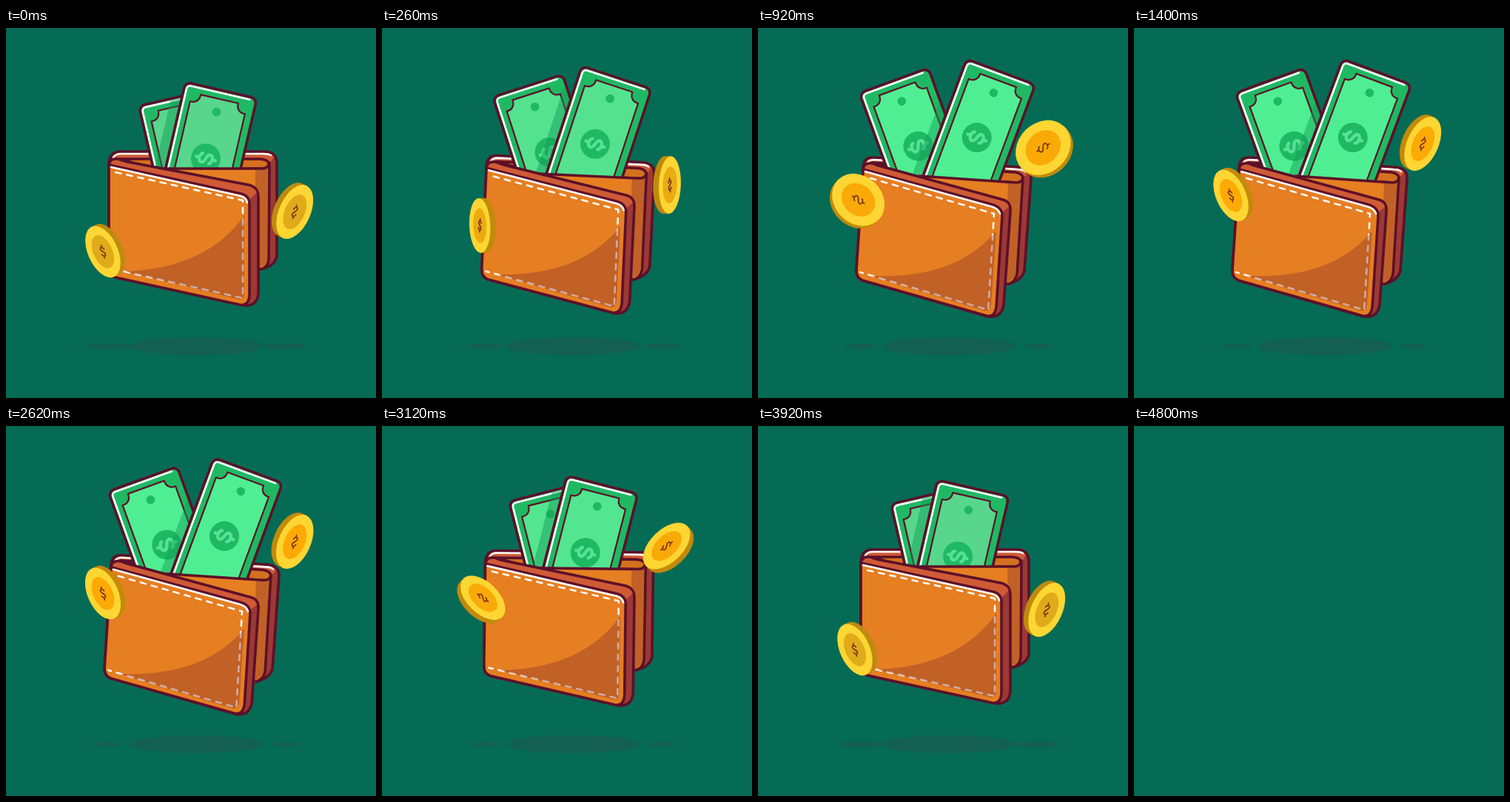
These frames come from a looping animation (500 px wide and 500 px high, 4820 ms). An HTML page:

```html
<!DOCTYPE html>
<html lang="en">
<head>
<meta charset="utf-8">
<title>Wallet</title>
<style>
  html, body { margin: 0; width: 100%; height: 100%; overflow: hidden; background: #056b55; }
  svg { display: block; width: 100%; height: 100%; }
  .line { stroke: #5c1029; stroke-width: 3.6; stroke-linejoin: round; stroke-linecap: round; }
  .thin { stroke-width: 2.2; }
  .orange { fill: #e67e22; }
  .red { fill: #cf5b36; }
  .dark { fill: #9c3935; }
  .shade { fill: #8e3a2c; opacity: .42; }
  .white { fill: none; stroke: #fff; stroke-width: 2.6; stroke-linecap: round; stroke-linejoin: round; }
  .stitch { stroke-width: 2.5; stroke-dasharray: 7.5 8; }
  .none { fill: none; }
  .edge { fill: #20b963; }
  .paper { fill: var(--paper); }
  .sign { fill: none; stroke-width: 4.4; stroke-linecap: round; }
  .stamp { stroke-width: 1.7; vector-effect: non-scaling-stroke; }
  .shadow { fill: #135f50; }
</style>
</head>
<body>
<svg viewBox="0 0 500 500">
  <defs>
    <path id="dollar" d="M6 -5.5C4 -10 -6 -10 -6 -5C-6 1 6 -1 6 5C6 10 -4 10 -6 5.5M0 -13V-9M0 9V13"/>
    <clipPath id="note"><rect x="1.5" y="1.5" width="96" height="190" rx="7"/></clipPath>
    <g id="bill">
      <rect class="edge line" width="99" height="190" rx="8"/>
      <path class="white" d="M3.5 186V9Q3.5 3.5 9 3.5H90"/>
      <path class="paper line thin" d="M24 12H76V14A10 10 0 0 0 86 24H88V186H12V24H14A10 10 0 0 0 24 14Z"/>
      <circle class="edge" cx="50" cy="30" r="5.8"/>
      <circle class="edge" cx="50" cy="94.5" r="20"/>
      <use href="#dollar" class="sign" stroke="#55e294" transform="translate(50 94.5) rotate(90)"/>
    </g>
  </defs>

  <g id="scene">
    <ellipse class="shadow" cx="257.5" cy="430" rx="90" ry="12"/>
    <ellipse class="shadow" id="shadowL" cx="138.5" cy="430"/>
    <ellipse class="shadow" id="shadowR" cx="378" cy="430"/>

    <path class="dark line" d="M139 190L139 184Q140 167 154 167L350 167Q366 167 366 184L366 308Q364 321 345 326L200 300Z"
      data-to="M142 196L142 188Q143 174 156 175L352 188Q370 189 369 204L360 328Q357 341 338 346L196 315Z"/>
    <path class="red" d="M141 190Q141 169 154 169L350 169Q358 169 362 174L356 184L152 187Z"
      data-to="M144 195Q144 176 156 177L352 190Q361 190 365 195L358 204L154 192Z"/>
    <path class="white" d="M145 175Q148 170 155 170L348 170Q355 170 358 172"
      data-to="M148 182Q150 178 157 178L350 191Q358 191 361 194"/>
    <path class="line" fill="#d4701f" d="M153 177L344 177Q355 178 355 184Q354 190 346 190L200 190Z"
      data-to="M155 182L348 195Q358 197 358 203Q357 209 349 209L218 200Z"/>

    <use href="#bill" id="backBill"/>
    <g id="cast" clip-path="url(#note)">
      <rect id="band" x="-14" y="-20" width="16" height="230" fill="#0f9a55" opacity=".45"/>
    </g>
    <use href="#bill" id="frontBill"/>

    <path class="orange line" d="M200 190L346 190Q355 190 356 182L355 312Q354 324 344 326L250 300Z"
      data-to="M218 200L349 209Q357 209 358 202L350 332Q348 343 338 346L245 320Z"/>
    <path class="shade" d="M337 192L346 192Q353 191 354 187L353 312Q352 322 337 325Z"
      data-to="M338 210L349 211Q355 211 356 207L348 332Q346 342 332 345Z"/>

    <path class="dark line" d="M139 186Q140 175 152 177Q158 180 170 182L328 212Q341 215 341 229L341 358Q340 376 322 375L148 337Q139 334 139 324Z"
      data-to="M142 192Q142 181 155 183Q162 186 174 189L331 232Q342 235 341 248L332 374Q329 392 311 390L141 341Q132 337 133 326Z"/>
    <path class="red" d="M141 186Q142 177 152 179Q158 182 170 184L328 214Q336 216 339 222L329 232L318 226Z"
      data-to="M144 192Q144 183 155 185Q162 188 174 191L331 234Q338 236 339 242L330 249L318 241Z"/>
    <path class="orange line" d="M139 185L318 224Q329 227 329 238L329 361Q328 376 316 374L148 337Q139 334 139 324Z"
      data-to="M142 191L318 239Q330 243 330 254L322 377Q320 391 309 389L141 341Q132 337 133 326Z"/>
    <path class="white" d="M142 188L317 227Q325 229 326 236" data-to="M145 194L316 241.5Q325 244 327 251"/>
    <path class="white stitch" d="M148 195L320 233L320 365L146 326"
      data-to="M152 203L319 251L311 381L138 330"/>
    <path class="shade" d="M160 329Q272 325 322 253L322 358Q322 367 316 367Z"
      data-to="M152 335Q268 340 322 274L315 374Q313 383 306 382Z"/>

    <g id="coinL"></g>
    <g id="coinR"></g>
  </g>
</svg>
<script>
const LOOP = 4820, OPEN_END = 1400, CLOSE = 2610, CLOSE_END = 3920, BLANK = 4800;
const R = 37, THICK = 8;
const $ = id => document.getElementById(id);
const lerp = (a, b, k) => a + (b - a) * k;
const clamp = v => Math.min(1, Math.max(0, v));
const easeOut = (v, power) => 1 - (1 - clamp(v)) ** power;
const mix = (a, b, k) => `rgb(${a.map((v, i) => Math.round(lerp(v, b[i], k)))})`;

const NUM = /-?\d+(\.\d+)?/g;
const morphs = [...document.querySelectorAll('[data-to]')].map(el => ({
  el, from: el.getAttribute('d'), to: el.dataset.to.match(NUM).map(Number)
}));

// Smooth curve through keys that never overshoots them.
function track(times, vals) {
  const slope = i => (vals[i + 1] - vals[i]) / (times[i + 1] - times[i]);
  const tan = vals.map((_, i) => {
    if (!i || i === vals.length - 1) return 0;
    const a = slope(i - 1), b = slope(i);
    return a * b > 0 ? 2 * a * b / (a + b) : 0;
  });
  return t => {
    let i = 0;
    while (i < times.length - 2 && t > times[i + 1]) i++;
    const d = times[i + 1] - times[i], u = clamp((t - times[i]) / d), w = 1 - u;
    return vals[i] * (1 + 2 * u) * w * w + tan[i] * d * u * w * w
      + vals[i + 1] * u * u * (3 - 2 * u) - tan[i + 1] * d * u * u * w;
  };
}

const KEYS = [0, 540, 861, 1000, 1110, 1400];
const key = (...vals) => track(KEYS, vals);
const shift = key(0, 4, 0, 0, 0, 0);
const tilt = key(-24, 21.6, -46, -45, -36, -24);
const spin = key(57, 90, 126, 180, 207, 417);
const grow = key(1, 1, 1, 1.1, 1.05, 1);
const coins = [
  { el: $('coinL'), shadow: $('shadowL'), x: 134, dir: 1, size: 1, y: key(301, 229, 234.5, 232, 229, 225) },
  { el: $('coinR'), shadow: $('shadowR'), x: 387, dir: -1, size: 1.05, y: key(247, 169.5, 164.5, 162, 160, 155) }
];

function drawCoin(c, t) {
  const y = c.y(t), p = (c.y(0) - y) / (c.y(0) - c.y(OPEN_END));
  const a = spin(t) * Math.PI / 180, cos = Math.cos(a), s = c.size * grow(t);
  const rx = Math.abs(cos) * R, h = THICK / 2 * Math.sin(a);
  const near = cos > 0 ? -h : h, w = Math.abs(h);
  const side = mix([190, 138, 16], [196, 138, 10], p);
  const disc = (x, k, fill) => `<ellipse cx="${x}" rx="${rx * k}" ry="${R * k}" fill="${fill}"/>`;
  c.el.setAttribute('transform',
    `translate(${c.x + c.dir * shift(t)} ${y}) scale(${c.dir * s} ${s}) rotate(${tilt(t)})`);
  c.el.innerHTML = disc(-near, 1, side)
    + `<rect x="${-w}" y="${-R}" width="${2 * w}" height="${2 * R}" fill="${side}"/>`
    + disc(near, 1, '#fdd633')
    + disc(near, .64, mix([223, 171, 27], [253, 170, 5], p))
    + `<path d="${$('dollar').getAttribute('d')}" class="sign stamp" stroke="#7a3412"
        transform="translate(${near}) scale(${c.dir * cos} 1) scale(${c.dir} 1) rotate(15) scale(.7)"/>`;
  c.shadow.setAttribute('rx', lerp(30, 19, p));
  c.shadow.setAttribute('ry', lerp(4, 3, p));
}

function place(el, b) {
  el.setAttribute('transform', `translate(${b.x} ${b.y}) rotate(${b.r})`);
}

function draw(t) {
  $('scene').style.display = t < BLANK ? '' : 'none';
  const closing = t >= CLOSE, back = (t - CLOSE) / (CLOSE_END - CLOSE);
  const k = closing ? 1 - easeOut(back, 3.4) : easeOut((t - 10) / (OPEN_END - 10), 6);
  const glow = closing ? 1 - clamp(back) : clamp(t / 540);
  const coinTime = closing ? OPEN_END * (1 - clamp(back)) : Math.min(t, OPEN_END);

  for (const m of morphs) {
    let i = 0;
    m.el.setAttribute('d', m.from.replace(NUM, v => lerp(+v, m.to[i++], k).toFixed(2)));
  }
  const front = { x: lerp(242.5, 282, k), y: lerp(73, 42, k), r: lerp(13, 20.5, k) };
  const rear = { x: lerp(179.5, 137, k), y: lerp(105.5, 88, k), r: lerp(-13, -20, k) };
  place($('frontBill'), front);
  place($('backBill'), rear);
  place($('cast'), rear);
  $('band').setAttribute('transform',
    `rotate(${-rear.r}) translate(${front.x - rear.x} ${front.y - rear.y}) rotate(${front.r})`);
  $('scene').style.setProperty('--paper', mix([87, 214, 140], [80, 238, 146], glow));
  coins.forEach(c => drawCoin(c, coinTime));
}

const start = performance.now();
function tick() {
  draw((performance.now() - start) % LOOP);
  requestAnimationFrame(tick);
}
tick();
</script>
</body>
</html>
```
